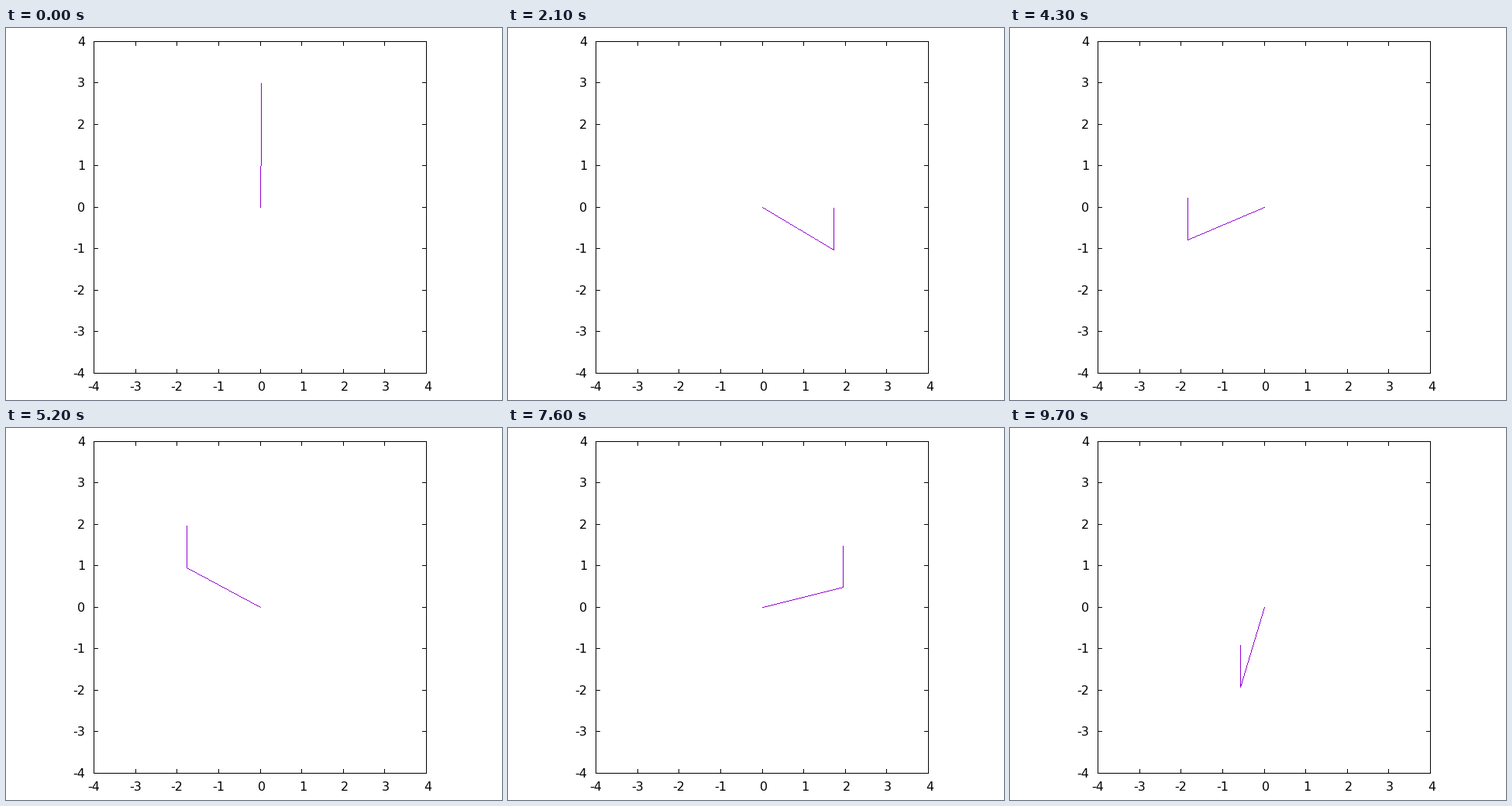
Recreate the animation shown at these times as a matplotlib script. Size 640 px wide and 480 px high, loop 9.8 s.

```python
import numpy as np
import matplotlib.pyplot as plt
from matplotlib.animation import FuncAnimation

WIDTH, HEIGHT, DPI = 640, 480, 80
LEFT, RIGHT, TOP, BOTTOM = 113, 542, 17, 445
LIMIT = 4
TICK = 5
PURPLE = (148, 0, 211)
FRAMES, INTERVAL = 98, 100
ARM, ROD = 2, 1
START, STEP = 0.01, 0.1  # radians, clockwise from straight up


def to_pixel(x, y):
    """Nearest pixel (column, row) for a point in plot units."""
    col = (x + LIMIT) * (RIGHT - LEFT) / (2 * LIMIT)
    row = (y + LIMIT) * (BOTTOM - TOP) / (2 * LIMIT)
    return LEFT + int(np.floor(col + 0.5)), BOTTOM - int(np.floor(row + 0.5))


def draw_line(canvas, start, end, color):
    """One-pixel line without antialiasing."""
    (x0, y0), (x1, y1) = start, end
    count = max(abs(x1 - x0), abs(y1 - y0)) + 1
    cols = np.floor(np.linspace(x0, x1, count) + 0.5).astype(int)
    rows = np.floor(np.linspace(y0, y1, count) + 0.5).astype(int)
    canvas[rows, cols] = color


def make_background():
    canvas = np.full((HEIGHT, WIDTH, 3), 255, dtype=np.uint8)
    canvas[[TOP, BOTTOM], LEFT:RIGHT + 1] = 0
    canvas[TOP:BOTTOM + 1, [LEFT, RIGHT]] = 0
    for value in range(-LIMIT, LIMIT + 1):
        col, row = to_pixel(value, value)
        canvas[TOP:TOP + TICK + 1, col] = 0
        canvas[BOTTOM - TICK:BOTTOM + 1, col] = 0
        canvas[row, LEFT:LEFT + TICK + 1] = 0
        canvas[row, RIGHT - TICK:RIGHT + 1] = 0
    return canvas


def add_labels(ax):
    font = dict(family="DejaVu Sans", size=16 * 72 / DPI, color="black",
                ha="left", va="baseline")
    for value in range(-LIMIT, LIMIT + 1):
        col, row = to_pixel(value, value)
        negative = value < 0
        ax.text(col - (8 if negative else 3), 468, str(value), **font)
        ax.text(86 if negative else 92, row + 6, str(value), **font)


fig = plt.figure(figsize=(WIDTH / DPI, HEIGHT / DPI), dpi=DPI,
                 facecolor="white")
ax = fig.add_axes([0, 0, 1, 1])
ax.axis("off")
background = make_background()
image = ax.imshow(background, extent=(0, WIDTH, HEIGHT, 0), aspect="auto",
                  interpolation="nearest")
add_labels(ax)


def update(frame):
    angle = START + STEP * frame
    x, y = ARM * np.sin(angle), ARM * np.cos(angle)
    canvas = background.copy()
    joint = to_pixel(x, y)
    draw_line(canvas, to_pixel(0, 0), joint, PURPLE)
    draw_line(canvas, joint, to_pixel(x, y + ROD), PURPLE)
    image.set_data(canvas)
    return (image,)


anim = FuncAnimation(fig, update, frames=FRAMES, interval=INTERVAL,
                     repeat=True, repeat_delay=0)
plt.show()
```
